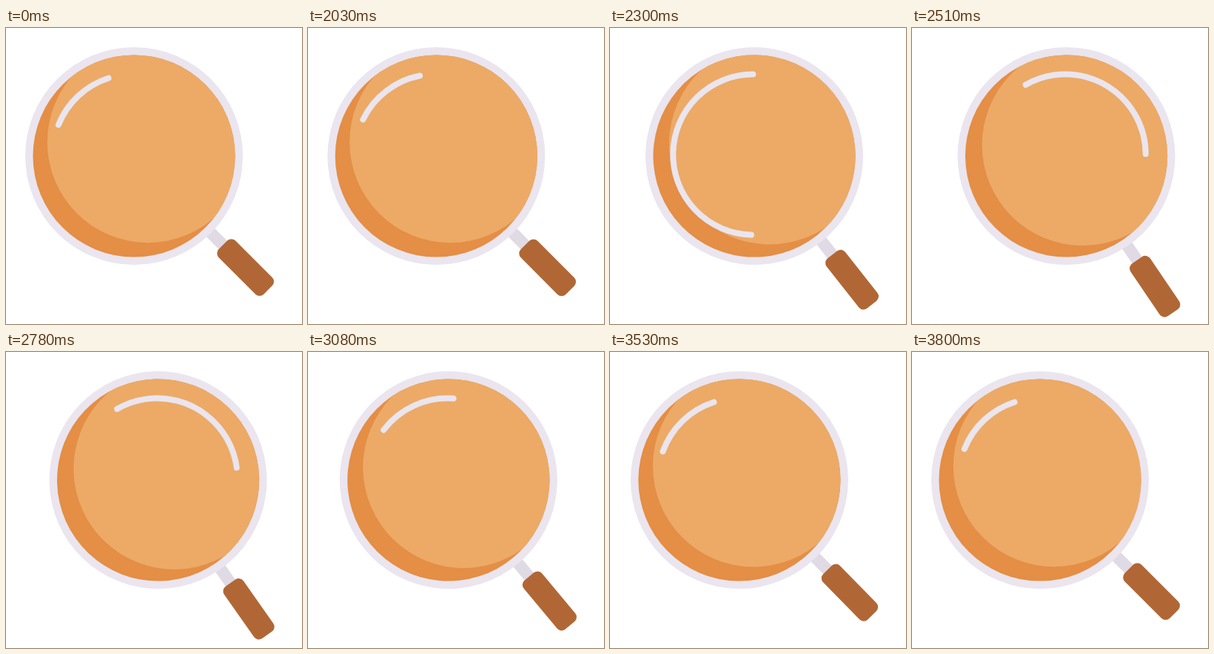
These frames come from a looping animation (400 by 400 pixels, 3.83 s). An HTML page with a canvas:

```html
<!DOCTYPE html>
<html lang="en">
<head>
<meta charset="utf-8">
<title>Magnifying glass</title>
<style>
html, body { margin: 0; width: 100%; height: 100%; overflow: hidden; background: #fff; }
canvas { display: block; width: 400px; height: 400px; }
</style>
</head>
<body>
<canvas id="stage"></canvas>
<script>
const LOOP = 3830, REST = 2000, STEP = 30;
const RAD = Math.PI / 180;
const RIM = '#eae5ee';
const canvas = document.getElementById('stage');
const ctx = canvas.getContext('2d');
const scale = window.devicePixelRatio || 1;
canvas.width = canvas.height = 400 * scale;

// Eased progress from 0 to 1 between two times: a cubic Bezier, flat at both ends
function ease(t, from, to, x1, x2) {
  const p = Math.min(1, Math.max(0, (t - from) / (to - from)));
  let lo = 0, hi = 1;
  for (let i = 0; i < 24; i++) {
    const s = (lo + hi) / 2, q = 1 - s;
    if (3 * q * q * s * x1 + 3 * q * s * s * x2 + s * s * s < p) lo = s;
    else hi = s;
  }
  return lo * lo * (3 - 2 * lo);
}

// The glass slides right and back
const slide = t => 36 * (ease(t, 0, 550, 0.33, 0.6) - ease(t, 550, 1830, 0.38, 0.35));

// The glint makes one full turn, overshooting before it settles; its head leads its tail
const headTurn = t => 470 * ease(t, 0, 560, 0.27, 0.28) - 110 * ease(t, 560, 1320, 0.66, 0.47);
const tailTurn = t => 405 * ease(t, 0, 560, 0.3, 0.59) - 48 * ease(t, 560, 1340, 0.4, 0.83)
  + 3 * ease(t, 1340, 1830, 0.33, 0.67);

function disc(x, y, r, color) {
  ctx.fillStyle = color;
  ctx.beginPath();
  ctx.arc(x, y, r, 0, 2 * Math.PI);
  ctx.fill();
}

function bar(x, y, w, h, r, color) {
  ctx.fillStyle = color;
  ctx.beginPath();
  ctx.moveTo(x + r, y);
  ctx.arcTo(x + w, y, x + w, y + h, r);
  ctx.arcTo(x + w, y + h, x, y + h, r);
  ctx.arcTo(x, y + h, x, y, r);
  ctx.arcTo(x, y, x + w, y, r);
  ctx.fill();
}

function drawGlass() {
  bar(138, -8, 40, 16, 0, '#e0dae4');
  bar(170, -16, 86, 32, 8, '#b16735');
  disc(0, 0, 147, RIM);
  disc(0, 0, 136.6, '#e48e46');
  ctx.clip();
  disc(0, -26.6, 136, '#ecaa66');
}

function drawGlint(start, end) {
  ctx.strokeStyle = RIM;
  ctx.lineWidth = 8;
  ctx.lineCap = 'round';
  ctx.beginPath();
  ctx.arc(-1.3, -2, 108.5, start * RAD, end * RAD);
  ctx.stroke();
}

function draw(t) {
  const shift = slide(t);
  ctx.setTransform(scale, 0, 0, scale, 0, 0);
  ctx.fillStyle = '#fff';
  ctx.fillRect(0, 0, 400, 400);
  ctx.translate(173 + shift, 173);

  ctx.save();
  ctx.rotate((45 + shift * 0.304) * RAD);
  drawGlass();
  ctx.restore();

  drawGlint(201.7 + tailTurn(t), 252.2 + headTurn(t));
}

function tick() {
  const t = performance.now() % LOOP - REST;
  draw(Math.max(0, Math.floor(t / STEP) * STEP));
  requestAnimationFrame(tick);
}
tick();
</script>
</body>
</html>
```
